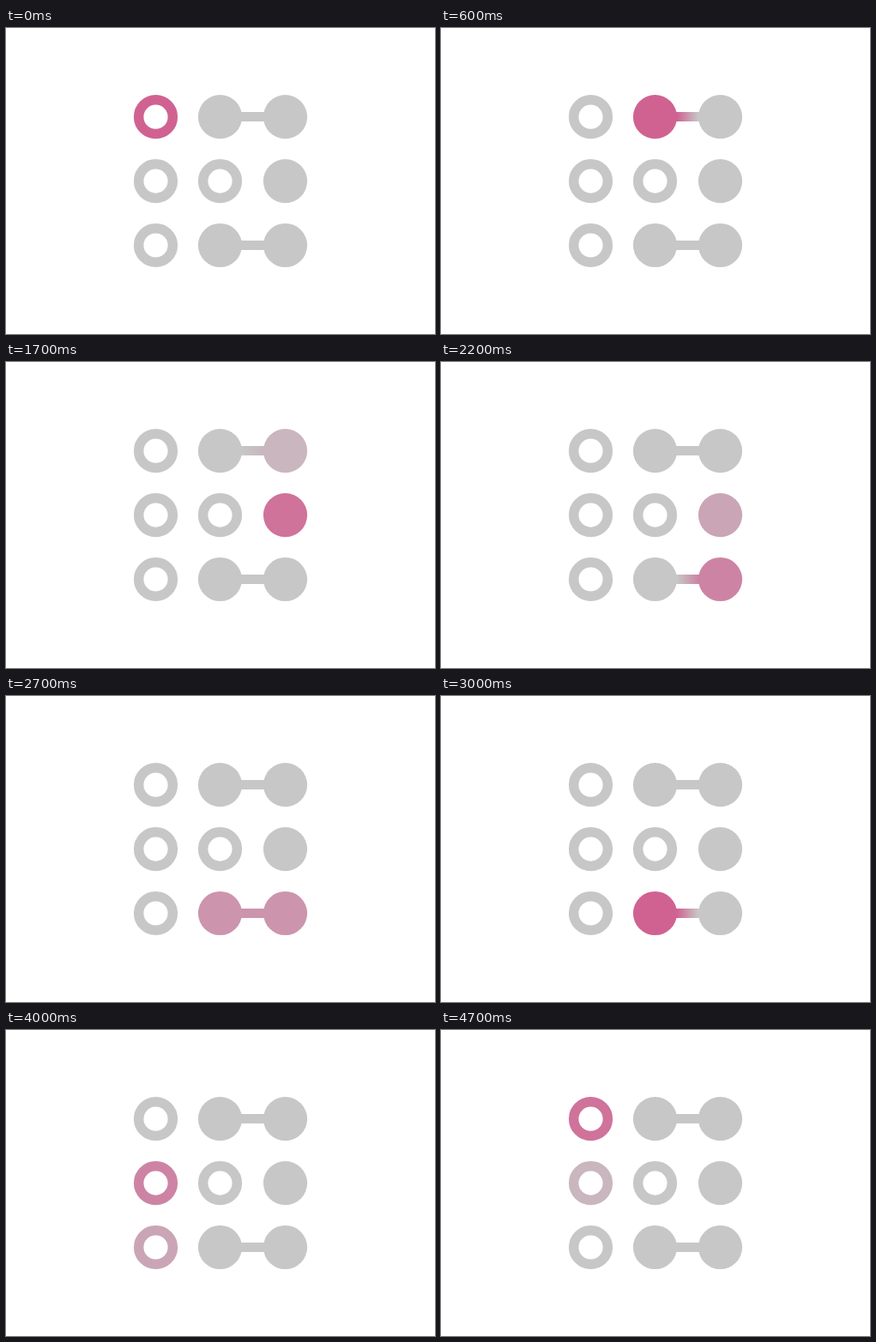
Recreate the animation shown at these times as an HTML page. Size 500 by 357 pixels, loop 4800 ms.

```html
<!DOCTYPE html>
<html lang="en">
<head>
<meta charset="utf-8">
<title>Dot grid loop</title>
<style>
  :root { --grey: #c7c7c7; --pink: #d06292; }
  html, body { margin: 0; width: 100%; height: 100%; overflow: hidden; background: #fff; }
  svg { display: block; width: 100%; height: 100%; color: var(--grey); }
  .dot { fill: currentColor; }
  .ring { fill: none; stroke: currentColor; stroke-width: 11.5; }
  stop { stop-color: var(--grey); }

  /* The highlight passes clockwise: each stop fades in and out in six steps. */
  .lit {
    animation: pulse 4.8s infinite;
    animation-delay: calc(var(--i) * .6s - 4.8s);
  }
  @keyframes pulse {
    0% { color: var(--pink); stop-color: var(--pink); animation-timing-function: steps(6, end); }
    12.5% { color: var(--grey); stop-color: var(--grey); }
    87.5% { color: var(--grey); stop-color: var(--grey); animation-timing-function: steps(6, end); }
    100% { color: var(--pink); stop-color: var(--pink); }
  }
</style>
</head>
<body>
<svg viewBox="0 0 500 357">
  <defs>
    <linearGradient id="top" gradientUnits="userSpaceOnUse" x1="275" x2="300" y1="0" y2="0">
      <stop class="lit" style="--i:1" offset="0"/>
      <stop class="lit" style="--i:2" offset="1"/>
    </linearGradient>
    <linearGradient id="bottom" gradientUnits="userSpaceOnUse" x1="275" x2="300" y1="0" y2="0">
      <stop class="lit" style="--i:5" offset="0"/>
      <stop class="lit" style="--i:4" offset="1"/>
    </linearGradient>
  </defs>

  <rect x="272" y="98" width="31" height="11" fill="url(#top)"/>
  <rect x="272" y="248" width="31" height="11" fill="url(#bottom)"/>

  <circle class="ring lit" style="--i:0" cx="174.5" cy="103.7" r="19.85"/>
  <circle class="dot lit" style="--i:1" cx="249.5" cy="103.7" r="25.6"/>
  <circle class="dot lit" style="--i:2" cx="325.5" cy="103.7" r="25.6"/>
  <circle class="dot lit" style="--i:3" cx="325.5" cy="178.6" r="25.6"/>
  <circle class="dot lit" style="--i:4" cx="325.5" cy="253.5" r="25.6"/>
  <circle class="dot lit" style="--i:5" cx="249.5" cy="253.5" r="25.6"/>
  <circle class="ring lit" style="--i:6" cx="174.5" cy="253.5" r="19.85"/>
  <circle class="ring lit" style="--i:7" cx="174.5" cy="178.6" r="19.85"/>
  <circle class="ring" cx="249.5" cy="178.6" r="19.85"/>
</svg>
</body>
</html>
```
